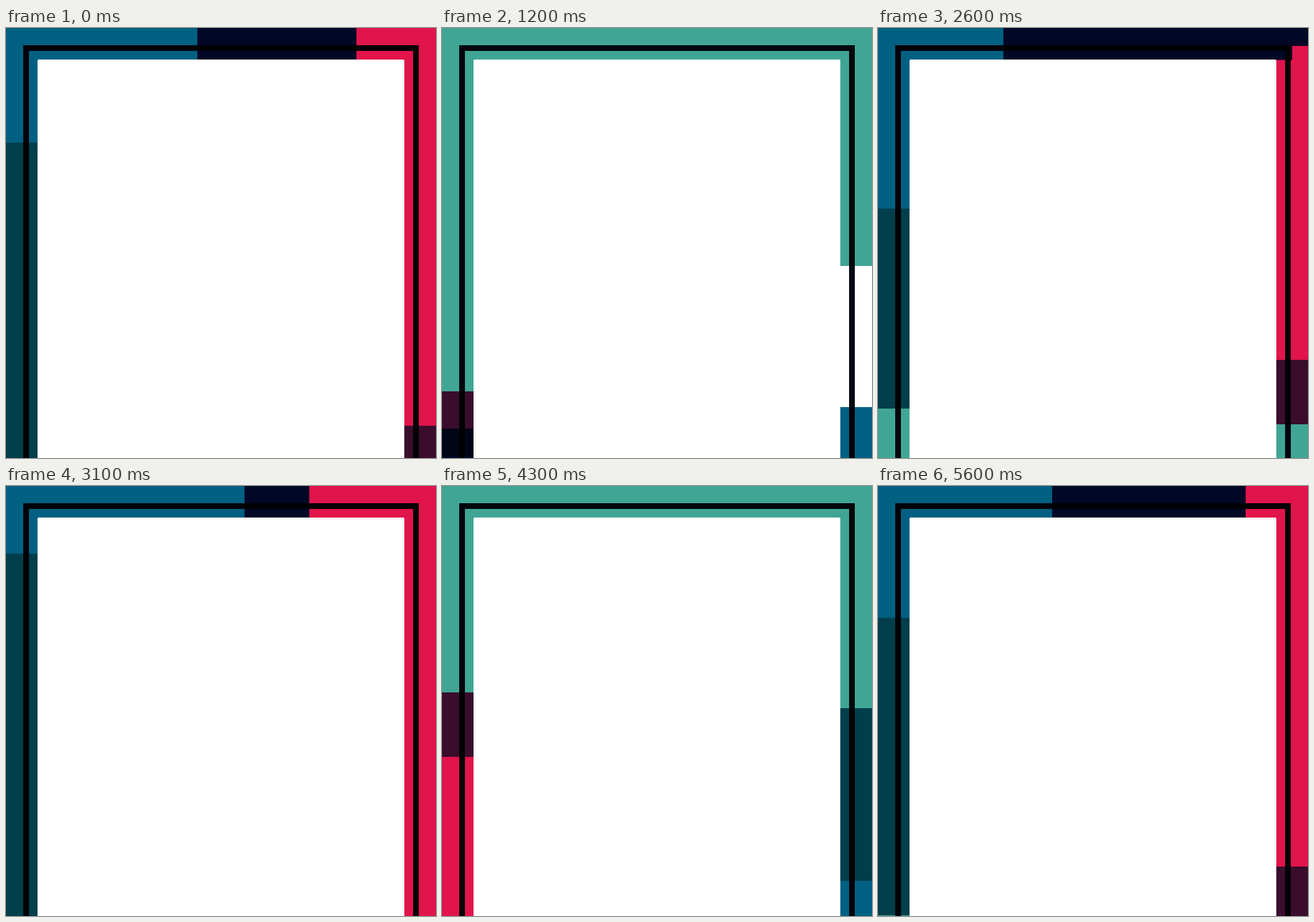
Recreate the animation shown at these times as an HTML page with a canvas. Size 600 px wide and 600 px high, loop 5700 ms.

```html
<!DOCTYPE html>
<html lang="en">
<head>
<meta charset="utf-8">
<title>Running frame</title>
<style>
html, body { margin: 0; width: 100%; height: 100%; overflow: hidden; background: #fff; }
canvas { display: block; width: 600px; height: 600px; }
</style>
</head>
<body>
<canvas id="stage" width="600" height="600"></canvas>
<script>
const ctx = document.getElementById('stage').getContext('2d');
const LOOP = 5700, STEP = 100, LAP = 2910;

// Ribbon path: a tall box whose lower part lies below the stage.
const LEFT = 22, TOP = 22, RIGHT = 578, BOTTOM = 800;
const SIDE = BOTTOM - TOP;
const LENGTH = 2 * (RIGHT - LEFT + SIDE);

// Start is measured clockwise from the top left corner.
const ribbons = [
  { color: '#41a595', start: 1089, size: 1441, dir: 1 },
  { color: '#e1144b', start: 245, size: 934, dir: 1 },
  { color: '#006081', start: -601, size: 1068, dir: -1 }
];

// Time within a lap and distance travelled.
const keys = [
  [0, 0], [690, 417], [1200, 1004], [1390, 1223],
  [1900, 1876], [2600, 2576], [2690, 2644], [LAP, LENGTH]
];

const slopes = keys.slice(1).map((k, i) => (k[1] - keys[i][1]) / (k[0] - keys[i][0]));
const tangents = keys.map((k, i) => {
  const a = slopes[(i + slopes.length - 1) % slopes.length];
  const b = slopes[i % slopes.length];
  return 2 * a * b / (a + b);
});

function travel(time) {
  const t = time % LAP;
  let i = 0;
  while (t >= keys[i + 1][0]) i++;
  const [t0, d0] = keys[i], [t1, d1] = keys[i + 1];
  const h = t1 - t0, u = (t - t0) / h, v = 1 - u;
  return d0 * v * v * (1 + 2 * u) + d1 * u * u * (3 - 2 * u)
    + h * u * v * (tangents[i] * v - tangents[i + 1] * u);
}

function tracePath() {
  ctx.beginPath();
  ctx.moveTo(LEFT, BOTTOM);
  ctx.lineTo(LEFT, TOP);
  ctx.lineTo(RIGHT, TOP);
  ctx.lineTo(RIGHT, BOTTOM);
  ctx.closePath();
}

function drawRibbon({ color, start, size, dir }, dist) {
  const pos = start + dir * dist + SIDE;
  ctx.setLineDash([size, LENGTH - size]);
  ctx.lineDashOffset = -(((pos % LENGTH) + LENGTH) % LENGTH);
  ctx.strokeStyle = color;
  ctx.lineWidth = 45;
  tracePath();
  ctx.stroke();
}

function draw(time) {
  const dist = travel(time);
  ctx.globalCompositeOperation = 'source-over';
  ctx.fillStyle = '#fff';
  ctx.fillRect(0, 0, 600, 600);

  ctx.globalCompositeOperation = 'multiply';
  ribbons.forEach(r => drawRibbon(r, dist));
  ctx.setLineDash([]);
  ctx.strokeStyle = '#060812';
  ctx.lineWidth = 8;
  ctx.strokeRect(28, 28, 544, 766);

  // The frame line stays outside the white card.
  ctx.globalCompositeOperation = 'source-over';
  ctx.fillStyle = '#fff';
  ctx.beginPath();
  ctx.roundRect(44, 44, 511.5, 600, 2);
  ctx.fill();
}

const begin = performance.now();
function tick() {
  const t = (performance.now() - begin) % LOOP;
  draw(Math.floor(t / STEP) * STEP);
  requestAnimationFrame(tick);
}
tick();
</script>
</body>
</html>
```
